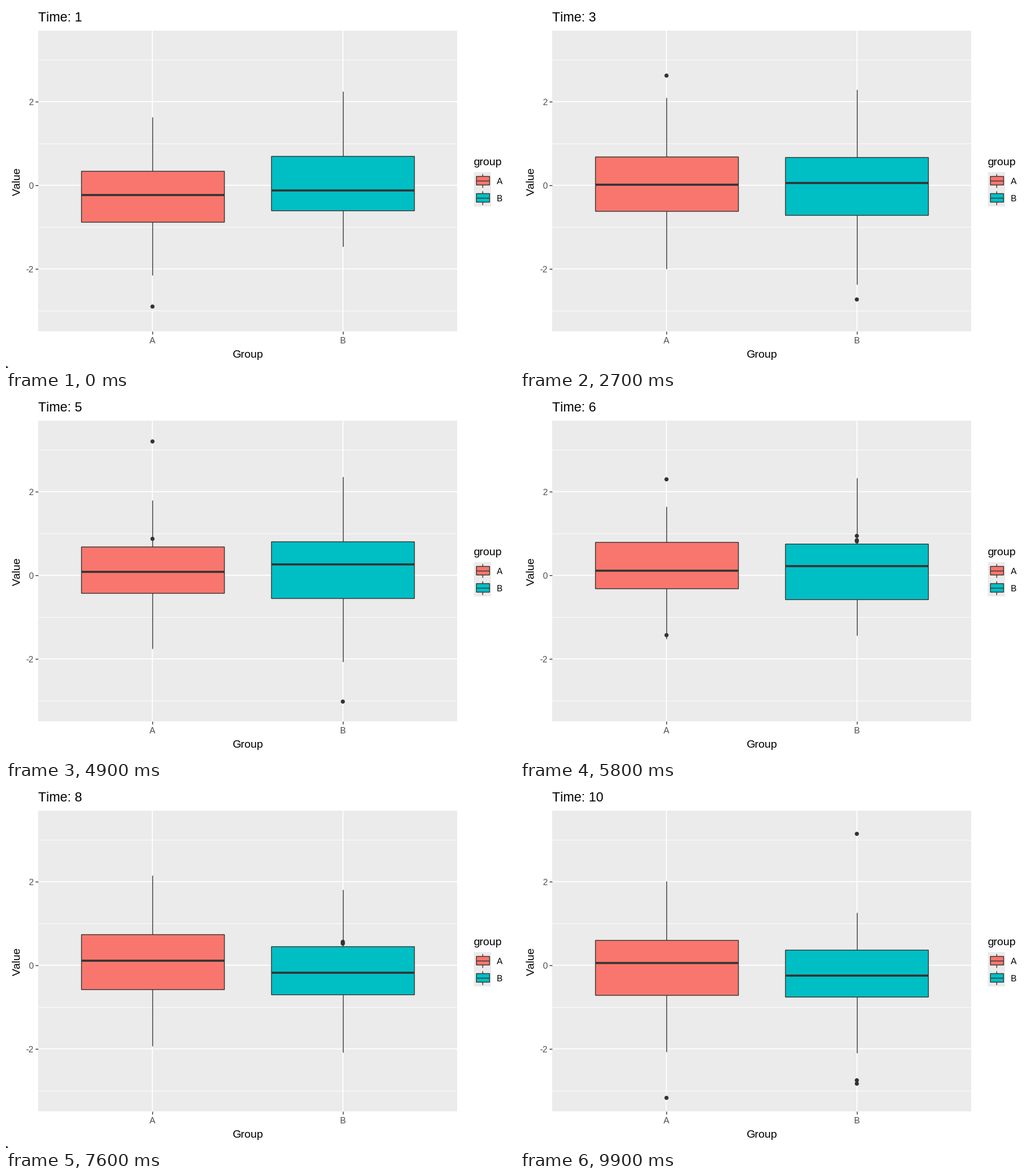
These frames come from a looping animation (885x632 px, 10000 ms). A matplotlib script:

```python
import matplotlib.pyplot as plt
import numpy as np
from matplotlib.animation import FuncAnimation
from matplotlib.patches import Rectangle

W, H, DPI = 885, 632, 120
FRAMES, STEP = 100, 11
LEFT, RIGHT, TOP, BOTTOM = 56, 786, 43.4, 568.4
ZERO, UNIT = 312.9, 73.05
HALF = 124.4
CENTERS = {"A": 255.2, "B": 586.8}
FILLS = {"A": "#F8766D", "B": "#00BFC4"}
DARK, PANEL, LABEL = "#333333", "#EBEBEB", "#4D4D4D"
TITLE, HEAD, SMALL = 23, 19.2, 15.3
THIN, THICK = 1.4, 3.6

# Key poses of the three quartiles; the box glides between them.
KEYS = [0, 15, 39, 58, 68, 84, 99]
QUARTILES = {
    "A": ([-0.88, -0.70, -0.54, -0.32, -0.45, -0.69, -0.71],
          [-0.23, -0.03, 0.05, 0.11, 0.06, 0.15, 0.05],
          [0.34, 0.81, 0.56, 0.79, 0.75, 0.72, 0.60]),
    "B": ([-0.61, -0.90, -0.52, -0.58, -0.66, -0.75, -0.75],
          [-0.12, -0.19, 0.30, 0.22, -0.14, -0.23, -0.25],
          [0.70, 0.49, 0.86, 0.75, 0.43, 0.46, 0.37]),
}
# Whisker length in box heights: base, swing, moment and period of the swing.
REACH = {
    "A": ((1.04, 0.20, 44, 100), (1.08, -0.31, 58, 70)),
    "B": ((1.20, -0.55, 0, 58), (1.18, -0.39, 39, 60)),
}
OUTLIERS = {
    "A": {0: [-2.90], 3: [2.62], 4: [3.37], 5: [2.99, -2.13], 9: [-3.17]},
    "B": {3: [-2.73], 4: [-3.02], 6: [2.46, 2.08, 1.98, -2.26, -2.41],
          8: [3.12, -2.82], 9: [3.14, -2.75, -2.83]},
}

plt.rcParams.update({
    "font.family": "Liberation Sans",
    "text.hinting": "default",
    "text.kerning_factor": 6,
})
fig = plt.figure(figsize=(W / DPI, H / DPI), dpi=DPI, facecolor="white")
ax = fig.add_axes([0, 0, 1, 1])
ax.set_xlim(0, W)
ax.set_ylim(H, 0)
ax.axis("off")


def pt(px):
    return px * 72 / DPI


def to_y(value):
    return ZERO - UNIT * np.asarray(value, dtype=float)


def line(xs, ys, color=DARK, width=THIN, z=2):
    return ax.plot(xs, ys, color=color, lw=pt(width), zorder=z,
                   solid_capstyle="butt")[0]


def rect(x, y, w, h, fill, edge="none", width=0, z=1):
    return ax.add_patch(Rectangle((x, y), w, h, facecolor=fill, edgecolor=edge,
                                  lw=pt(width), joinstyle="miter", zorder=z))


def text(x, y, s, size, color="black", ha="left", **kw):
    return ax.text(x, y, s, fontsize=pt(size), color=color, ha=ha,
                   va="baseline", **kw)


def draw_panel():
    rect(LEFT, TOP, RIGHT - LEFT, BOTTOM - TOP, PANEL)
    for v in range(-3, 4):
        y = to_y(v)
        major = v % 2 == 0
        line([LEFT, RIGHT], [y, y], "white", 1.7 if major else 0.9, 1.1)
        if major:
            line([LEFT - 4.8, LEFT], [y, y])
            text(47.6, y + 6, str(v), SMALL, LABEL, "right")
    for name, x in CENTERS.items():
        line([x, x], [TOP, BOTTOM], "white", 1.7, 1.2)
        line([x, x], [BOTTOM, BOTTOM + 4.8])
        text(x, 589, name, SMALL, LABEL, "center")
    text(421, 614, "Group", HEAD, ha="center")
    text(24.5, 306, "Value", HEAD, ha="center", rotation=90,
         rotation_mode="anchor")


def draw_legend():
    size = 30.2
    text(814.6, 278.3, "group", HEAD)
    for i, name in enumerate("AB"):
        x, y = 815.2, 289.5 + i * size
        cx, cy = x + size / 2, y + size / 2
        rect(x, y, size, size, PANEL)
        line([cx, cx], [y + 0.1 * size, y + 0.9 * size])
        rect(x + size / 8, y + size / 4, size * 0.75, size / 2,
             FILLS[name], DARK, THIN, 3)
        line([x + size / 8, x + size * 7 / 8], [cy, cy], z=4)
        text(855, 311 + i * size, name, SMALL)


def reach(frame, base, swing, moment, period):
    return base + swing * np.cos(np.pi * (frame - moment) / period) ** 16


def five_numbers(name, frame):
    q1, mid, q3 = (np.interp(frame, KEYS, q) for q in QUARTILES[name])
    down, up = (reach(frame, *r) for r in REACH[name])
    return q1 - down * (q3 - q1), q1, mid, q3, q3 + up * (q3 - q1)


def spread(short, full):
    """Match every point of `full` with a point to travel from or to."""
    if len(short) == 0:
        return np.full(len(full), full.mean())
    return short[np.abs(full[:, None] - short).argmin(axis=1)]


def outliers_at(name, frame):
    k, rest = divmod(frame, STEP)
    a = np.sort(OUTLIERS[name].get(k, []))
    if rest == 0:
        return a
    b = np.sort(OUTLIERS[name].get(k + 1, []))
    if len(a) < len(b):
        a = spread(a, b)
    elif len(b) < len(a):
        b = spread(b, a)
    return a + (b - a) * rest / STEP


class Box:
    def __init__(self, name):
        self.name, self.x = name, CENTERS[name]
        x0, x1 = self.x - HALF, self.x + HALF
        self.dots = ax.scatter([], [], s=pt(7.2) ** 2, color=DARK,
                               edgecolors="none", zorder=3)
        self.whisker = line([self.x] * 2, [0, 0], z=4)
        self.body = rect(x0, 0, 2 * HALF, 0, FILLS[name], DARK, THIN, 5)
        self.median = line([x0, x1], [0, 0], width=THICK, z=6)

    def set(self, frame):
        low, q1, mid, q3, high = to_y(five_numbers(self.name, frame))
        self.whisker.set_ydata([low, high])
        self.body.set_y(q3)
        self.body.set_height(q1 - q3)
        self.median.set_ydata([mid, mid])
        ys = to_y(outliers_at(self.name, frame))
        self.dots.set_offsets(np.column_stack([np.full(len(ys), self.x), ys]))


draw_panel()
draw_legend()
boxes = [Box("A"), Box("B")]
title = text(55.8, 27, "", TITLE)


def update(frame):
    for box in boxes:
        box.set(frame)
    title.set_text(f"Time: {round(1 + frame / STEP)}")
    return []


anim = FuncAnimation(fig, update, frames=FRAMES, interval=100, repeat=True,
                     repeat_delay=0, blit=False)
plt.show()
```
